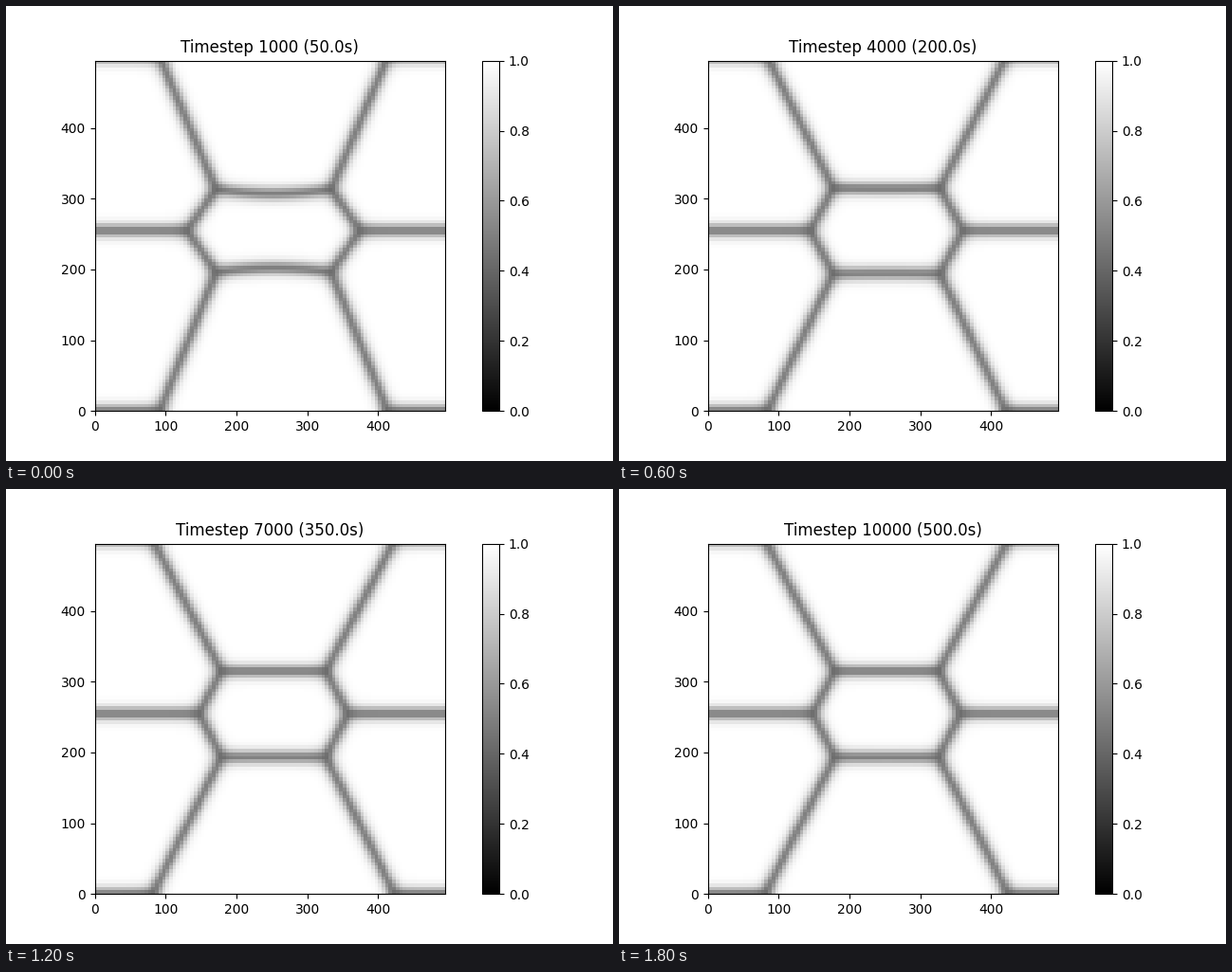
These frames come from a looping animation (640x480 px, 2000 ms). A matplotlib script:

```python
import numpy as np
import matplotlib.pyplot as plt
from matplotlib.animation import FuncAnimation

CELL, SIZE, PERIOD = 5, 495, 500
MID_X, MID_Y = 252.5, 255
STEEPNESS = 0.115
FRAMES, INTERVAL = 10, 200

edges = np.arange(0, SIZE + CELL, CELL)
centers = edges[:-1] + CELL / 2
X, Y = np.meshgrid(centers, centers)
H = np.abs(X - MID_X)  # the pattern is mirrored about MID_X


def relax(final, offset, rate, n):
    """Value decaying exponentially towards its rest position."""
    return final + offset * rate ** n


def path_distance(points):
    """Distance of every cell centre to a polyline."""
    best = np.full(H.shape, np.inf)
    for (x0, y0), (x1, y1) in zip(points, points[1:]):
        dx, dy = x1 - x0, y1 - y0
        s = ((H - x0) * dx + (Y - y0) * dy) / (dx * dx + dy * dy)
        s = np.clip(s, 0, 1)
        best = np.minimum(best, np.hypot(H - x0 - s * dx, Y - y0 - s * dy))
    return best


def order_field(n):
    """Sum of squared order parameters of the four grains."""
    tip_h = MID_X - relax(148, -17.5, 0.58, n)
    joint_h = MID_X - relax(179.3, -8.3, 0.65, n)
    corner_h = MID_X - relax(80.5, 11.3, 0.68, n)
    top = relax(315, -2, 0.57, n)
    low = relax(193.5, 2.5, 0.57, n)
    sag = relax(0, 6, 0.45, n)

    def bow(h):
        return sag * np.clip(1 - (h / joint_h) ** 2, 0, None)

    tip, upper, lower = (tip_h, MID_Y), (joint_h, top), (joint_h, low)
    corner0, corner1 = (corner_h, 0), (corner_h, PERIOD)
    curve_h = np.linspace(-joint_h, joint_h, 17)

    # grains: 0 centre, 1 middle, 2 upper side, 3 lower side
    walls = [
        ((0, 2), [tip, upper]),
        ((0, 3), [tip, lower]),
        ((0, 1), list(zip(curve_h, top - bow(curve_h)))),
        ((0, 1), list(zip(curve_h, low + bow(curve_h)))),
        ((1, 2), [upper, corner1]),
        ((1, 3), [lower, corner0]),
        ((1, 2), [corner0, (joint_h, top - PERIOD)]),
        ((1, 3), [corner1, (joint_h, low + PERIOD)]),
        ((2, 3), [tip, (300, MID_Y)]),
        ((2, 3), [corner0, (300, 0)]),
        ((2, 3), [corner1, (300, PERIOD)]),
    ]
    dist = np.full((4,) + H.shape, np.inf)
    for grains, points in walls:
        d = path_distance(points)
        for g in grains:
            dist[g] = np.minimum(dist[g], d)

    side = np.interp(Y, [0, low, MID_Y, top, PERIOD],
                     [corner_h, joint_h, tip_h, joint_h, corner_h])
    in_centre = (Y > low + bow(H)) & (Y < top - bow(H))
    label = np.where(H < side, np.where(in_centre, 0, 1),
                     np.where(Y > MID_Y, 2, 3))

    # weights give a tanh profile across walls and 120 degree junctions
    inside = label == np.arange(4)[:, None, None]
    k = np.sqrt(3)
    phi = np.exp(STEEPNESS * np.where(inside, (2 - k) * dist, -k * dist))
    phi /= phi.sum(axis=0)
    squares, cubes = (phi ** 2).sum(axis=0), (phi ** 3).sum(axis=0)
    # the second term is nonzero only where three grains meet
    return squares + 0.4 * (1 - 3 * squares + 2 * cubes)


fig, ax = plt.subplots(figsize=(6.4, 4.8), dpi=100)
mesh = ax.pcolormesh(edges, edges, order_field(0), cmap="gray",
                     vmin=0, vmax=1)
fig.colorbar(mesh, ax=ax)
ax.set_aspect("equal")
ax.set_anchor("C")  # colorbar() would leave the axes right-aligned
ax.set_xlim(0, SIZE)
ax.set_ylim(0, SIZE)
title = ax.set_title("")


def update(n):
    step = 1000 * (n + 1)
    mesh.set_array(order_field(n))
    title.set_text(f"Timestep {step} ({step / 20}s)")
    return mesh, title


anim = FuncAnimation(fig, update, frames=FRAMES, interval=INTERVAL,
                     repeat=True, repeat_delay=0, blit=False)
plt.show()
```
